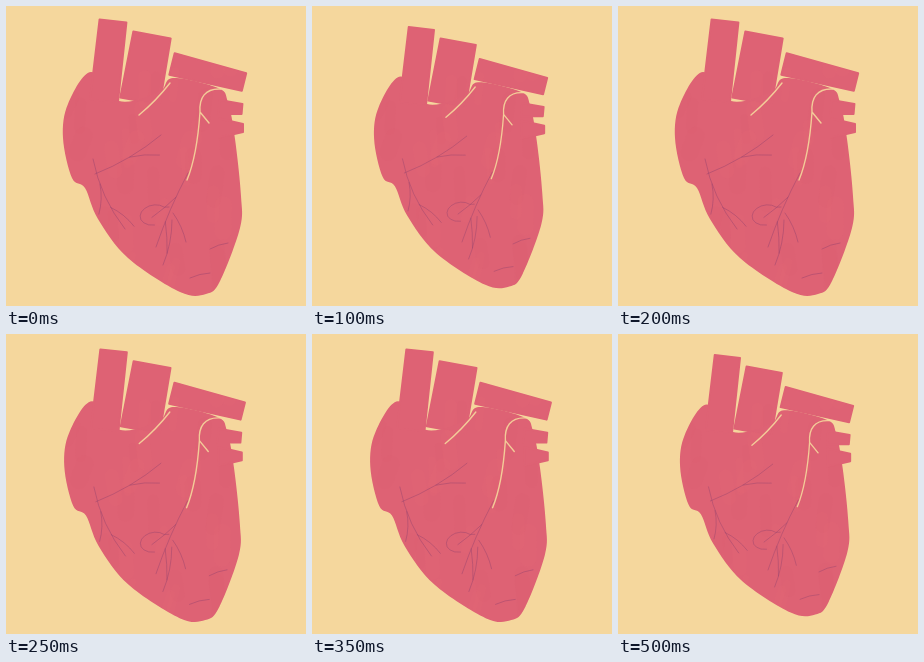
An HTML page with a canvas that plays this animation: 300x300 px, repeating every 550 ms.

```html
<!DOCTYPE html>
<html lang="en">
<head>
<meta charset="utf-8">
<title>Beating heart</title>
<style>
  html, body { margin: 0; width: 100%; height: 100%; overflow: hidden; background: #f5d79d; }
  canvas { display: block; width: 300px; height: 300px; }
</style>
</head>
<body>
<canvas id="stage" width="300" height="300"></canvas>
<script>
const ctx = document.getElementById('stage').getContext('2d');
const SIZE = 300, STEP = 50, STEPS = 11;
const CREAM = '#f5d79d', FLESH = '#de6274', VEIN = '#93426d';

function seeded(seed) {
  return () => (seed = (seed * 16807) % 2147483647) / 2147483647;
}

// Closed Catmull-Rom curve through the given points
function blob(...pts) {
  const path = new Path2D(), n = pts.length;
  path.moveTo(...pts[0]);
  pts.forEach((b, i) => {
    const a = pts[(i + n - 1) % n], c = pts[(i + 1) % n], d = pts[(i + 2) % n];
    path.bezierCurveTo(
      b[0] + (c[0] - a[0]) / 6, b[1] + (c[1] - a[1]) / 6,
      c[0] - (d[0] - b[0]) / 6, c[1] - (d[1] - b[1]) / 6, ...c);
  });
  return path;
}

// Tapered vessel stump, square to its axis
function tube(x1, y1, x2, y2, w1, w2) {
  const path = new Path2D(), length = Math.hypot(x2 - x1, y2 - y1);
  const nx = (y1 - y2) / length / 2, ny = (x2 - x1) / length / 2;
  path.moveTo(x1 + nx * w1, y1 + ny * w1);
  path.lineTo(x2 + nx * w2, y2 + ny * w2);
  path.lineTo(x2 - nx * w2, y2 - ny * w2);
  path.lineTo(x1 - nx * w1, y1 - ny * w1);
  path.closePath();
  return path;
}

const body = blob(
  [85, 66], [113, 95], [153, 86], [167, 72], [212, 82], [222, 96],
  [229, 133], [235, 190], [234, 222], [214, 275], [200, 288], [174, 286],
  [122, 252], [92, 213], [79, 182], [66, 172], [57, 132], [62, 98]);

const heart = new Path2D(body);
const tubes = [
  tube(107, 15, 98, 95, 27, 28),
  tube(146, 29, 134, 95, 38, 40),
  tube(166, 58, 238, 76, 22, 18),
  tube(213, 101, 236, 103, 14, 10),
  tube(213, 122, 237, 122, 19, 8)
];
tubes.forEach(t => heart.addPath(t));

// Curved vessel that sheds shorter twigs to alternating sides
function vessel(path, x1, y1, x2, y2, bend, twigs) {
  const dx = x2 - x1, dy = y2 - y1;
  path.moveTo(x1, y1);
  path.quadraticCurveTo((x1 + x2) / 2 - dy * bend, (y1 + y2) / 2 + dx * bend, x2, y2);
  for (let i = 1; i <= twigs; i++) {
    const t = i / (twigs + 1), side = i % 2 ? 0.5 : -0.5;
    const sway = 2 * t * (1 - t) * bend;
    const x = x1 + dx * t - dy * sway, y = y1 + dy * t + dx * sway;
    vessel(path, x, y, x + (dx - dy * side) * 0.35, y + (dy + dx * side) * 0.35, -bend, 0);
  }
}

const veins = new Path2D();
vessel(veins, 87, 153, 119, 223, 0.12, 2);
vessel(veins, 89, 168, 155, 129, 0.08, 1);
vessel(veins, 182, 167, 150, 241, 0.04, 2);
vessel(veins, 167, 207, 180, 236, -0.1, 0);
vessel(veins, 166, 214, 157, 259, -0.1, 0);
vessel(veins, 222, 237, 204, 243, 0.1, 0);
vessel(veins, 204, 267, 184, 272, 0.1, 0);
veins.moveTo(163, 201);
veins.ellipse(148, 209, 14, 10, -0.2, -0.6, -4.6, true);

const seams = new Path2D('M164 77Q150 95 133 109 M215 83C199 82 193 92 194 106Q191 150 181 174 M194 106L203 117');

const random = seeded(7);
const dabs = Array.from({ length: 40 }, () => {
  const x = 65 + random() * 165, y = 30 + random() * 245;
  return {
    path: new Path2D(`M${x} ${y}l${random() * 12 - 8} ${15 + random() * 20}`),
    width: 6 + random() * 12,
    color: random() < 0.5 ? '#d4586d' : '#e66d76'
  };
});

function stroke(path, width, color, alpha) {
  ctx.lineWidth = width;
  ctx.strokeStyle = color;
  ctx.globalAlpha = alpha;
  ctx.stroke(path);
}

function drawHeart() {
  ctx.fillStyle = FLESH;
  ctx.fill(body);
  tubes.forEach(t => {
    ctx.fill(t);
    stroke(t, 2, FLESH, 1);
  });
  ctx.save();
  ctx.clip(heart);
  dabs.forEach(d => stroke(d.path, d.width, d.color, 0.1));
  stroke(veins, 0.9, VEIN, 0.5);
  ctx.restore();
  stroke(seams, 1.4, CREAM, 0.9);
}

function draw(time) {
  const step = Math.floor(time / STEP) % STEPS;
  const squeeze = (1 - Math.cos(step * Math.PI / 2)) / 2;
  const scale = 1 - 0.055 * squeeze ** 2;
  ctx.setTransform(1, 0, 0, 1, 0, 0);
  ctx.globalAlpha = 1;
  ctx.fillStyle = CREAM;
  ctx.fillRect(0, 0, SIZE, SIZE);
  ctx.translate(SIZE / 2, SIZE / 2);
  ctx.scale(scale, scale);
  ctx.translate(-SIZE / 2, -SIZE / 2);
  ctx.lineCap = ctx.lineJoin = 'round';
  drawHeart();
}

let start;
function tick(now) {
  start ??= now;
  draw(now - start);
  requestAnimationFrame(tick);
}
draw(0);
requestAnimationFrame(tick);
</script>
</body>
</html>
```
